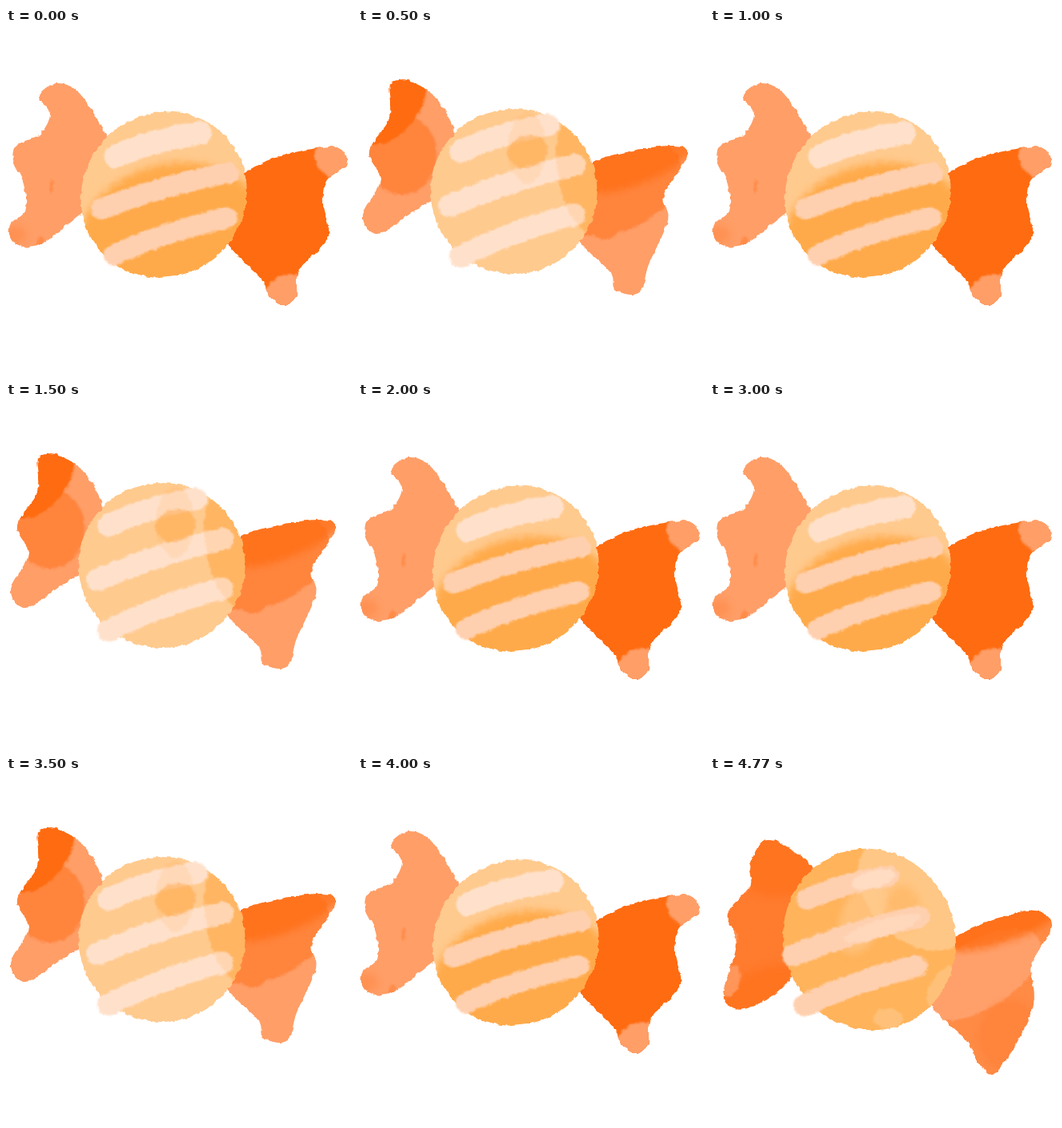
These frames come from a looping animation (432 by 432 pixels, 5.01 s). An HTML page:

```html
<!DOCTYPE html>
<html lang="en">
<head>
<meta charset="utf-8">
<title>Candy</title>
<style>
  html, body { margin: 0; width: 100%; height: 100%; overflow: hidden; background: #fff; }
  svg { display: block; width: 100vw; height: 100vh; }
  .pose { visibility: hidden; }
  .stripe { fill: none; stroke-linecap: round; }
</style>
</head>
<body>
<svg id="stage" viewBox="0 0 432 432" color-interpolation-filters="sRGB">
  <defs>
    <filter id="rough" filterUnits="userSpaceOnUse" x="0" y="0" width="432" height="432">
      <feTurbulence type="fractalNoise" baseFrequency=".13" numOctaves="2" seed="4"/>
      <feDisplacementMap in="SourceGraphic" scale="5" xChannelSelector="R" yChannelSelector="G"/>
    </filter>
    <filter id="soft" filterUnits="userSpaceOnUse" x="0" y="0" width="432" height="432">
      <feGaussianBlur stdDeviation="1.2"/>
    </filter>
    <filter id="wash" filterUnits="userSpaceOnUse" x="0" y="0" width="432" height="432">
      <feGaussianBlur stdDeviation="5"/>
    </filter>
  </defs>
</svg>
<script>
const DEEP = '#ff6b10', MID = '#ff7f34', PALE = '#ff9e67';
const AMBER = '#ffaa4a', HONEY = '#ffca8e', CREAM = '#ffe1cb', PEACH = '#ffd0af';

// Closed smooth curve through "x,y x,y ..." key points.
function curve(text) {
  const p = text.split(' ').map(s => s.split(',').map(Number));
  const at = i => p[(i + p.length) % p.length];
  const handle = (from, a, b, sign) => from.map((v, k) => v + sign * (b[k] - a[k]) / 6);
  return `M${p[0]}` + p.map((b, i) => {
    const a = at(i - 1), c = at(i + 1), d = at(i + 2);
    return `C${handle(b, a, c, 1)} ${handle(c, b, d, -1)} ${c}`;
  }).join('') + 'Z';
}

const oval = (cx, cy, rx, ry, turn = 0) =>
  `<ellipse cx="${cx}" cy="${cy}" rx="${rx}" ry="${ry}" transform="rotate(${turn} ${cx} ${cy})"/>`;

const tint = (color, opacity, shape, filter = 'soft') =>
  `<g filter="url(#${filter})"><g fill="${color}" opacity="${opacity}">${shape}</g></g>`;
const wash = (color, opacity, shape) => tint(color, opacity, shape, 'wash');

// A shape filled with one colour, with tints kept inside its outline.
let clips = 0;
function piece(shape, fill, ...tints) {
  const id = 'clip' + clips++;
  return `<clipPath id="${id}">${shape}</clipPath>
    <g fill="${fill}">${shape}</g><g clip-path="url(#${id})">${tints.join('')}</g>`;
}
const wing = (points, fill, ...tints) => piece(`<path d="${curve(points)}"/>`, fill, ...tints);

function stripe(color, width, x1, y1, x2, y2) {
  const bend = 8, mx = (x1 + x2) / 2, my = (y1 + y2) / 2 - bend;
  return `<path class="stripe" d="M${x1} ${y1}Q${mx} ${my} ${x2} ${y2}"
    stroke="${color}" stroke-width="${width}" filter="url(#soft)"/>`;
}

const curledLeft = '41,85 64,69 94,84 131,145 150,190 92,233 42,271 10,268 5,246 24,228 22,195 9,165 14,146 42,133 55,107';
const curledRight = '298,181 350,158 412,149 425,170 400,191 396,222 402,262 366,302 362,335 345,346 328,333 318,312 279,272 260,225';
const foldedLeft = '40,92 40,72 60,65 98,88 123,140 112,195 65,232 24,257 6,235 28,190 14,155 38,116';
const foldedRight = '290,171 335,155 395,147 411,160 382,208 387,240 362,298 355,326 340,333 320,325 315,305 277,267 250,220';
const openLeft = '50,112 68,80 100,91 130,122 130,200 92,262 42,291 17,275 33,210 22,172 50,138';
const openRight = '303,203 355,179 405,168 427,188 402,235 404,285 378,342 355,371 338,362 318,328 278,288 260,235';

const tiltedBall = oval(197, 208, 106, 101, -45);
const lowerGlow = oval(205, 255, 115, 85, -15);
const rightTips = tint(PALE, 1, oval(414, 164, 30, 24, 25) + oval(346, 331, 30, 20, -35));
const topFold = oval(38, 95, 58, 38, -50);
const sideShade = oval(282, 185, 32, 75, -12);

const curled =
  wing(curledLeft, PALE,
    wash('#ff8846', .6, oval(10, 258, 15, 12)),
    tint(MID, .6, oval(42, 267, 4, 7, 20) + oval(57, 198, 2, 8))) +
  wing(curledRight, DEEP, rightTips) +
  piece(tiltedBall, HONEY, wash(AMBER, 1, lowerGlow)) +
  stripe(CREAM, 29, 137, 160, 242, 131) +
  stripe(PEACH, 26, 119, 226, 278, 181) +
  stripe(PEACH, 26, 135, 283, 276, 237);

const turning =
  wing(foldedLeft, MID, wash(DEEP, .6, topFold)) +
  wing(curledRight, MID, wash(DEEP, .6, oval(350, 180, 90, 34, -18)), rightTips) +
  piece(tiltedBall, HONEY, wash(AMBER, .5, lowerGlow)) +
  stripe(CREAM, 28, 132, 158, 239, 126) +
  stripe(CREAM, 27, 116, 224, 275, 176) +
  stripe(CREAM, 27, 130, 284, 273, 235);

const folded =
  wing(foldedLeft, PALE, tint(MID, .8, oval(54, 158, 44, 50)), tint(DEEP, 1, topFold)) +
  wing(foldedRight, PALE,
    tint(MID, .8, oval(325, 200, 85, 52, -25) + oval(308, 248, 18, 16)),
    wash(DEEP, .7, oval(335, 165, 90, 34, -18))) +
  piece(oval(194.5, 204, 104, 103), HONEY, tint(AMBER, .55, sideShade)) +
  stripe(CREAM, 28, 128, 154, 237, 121) +
  stripe(CREAM, 28, 114, 222, 271, 171) +
  stripe(CREAM, 28, 128, 285, 270, 233) +
  tint(AMBER, .5, oval(212, 154, 25, 20, -15)) +
  tint(AMBER, .15, oval(211, 150, 24, 44)) +
  piece(oval(194.5, 204, 104, 103), 'none', tint(AMBER, .2, sideShade));

const open =
  wing(openLeft, '#ff7b2d',
    wash(DEEP, .45, oval(85, 110, 55, 40) + oval(70, 275, 60, 35, -20)),
    tint(PALE, .8, oval(26, 256, 11, 20, 15) + oval(28, 203, 6, 12))) +
  wing(openRight, '#ff8b45',
    tint('#ffa06b', 1, oval(338, 248, 85, 42, -32)),
    wash(DEEP, .8, oval(365, 188, 75, 20, -18)),
    wash(MID, .5, oval(375, 325, 40, 45))) +
  piece(oval(199, 204, 107, 114, -20), '#ffb35a',
    tint(HONEY, .85, oval(258, 145, 85, 60, 45)),
    wash(AMBER, .4, oval(240, 165, 22, 28)),
    wash(HONEY, .6, oval(190, 175, 26, 50, 20)),
    tint(HONEY, .6, oval(222, 303, 18, 13) + oval(288, 262, 12, 28, 30))) +
  stripe(PEACH, 26, 121, 154, 223, 125) +
  stripe(PEACH, 28, 104, 224, 260, 176) +
  stripe(PEACH, 28, 118, 286, 257, 238) +
  tint(CREAM, .7, oval(204, 129, 28, 11, -15)) +
  tint(CREAM, .45, oval(215, 190, 50, 11, -17));

const stage = document.getElementById('stage');
stage.insertAdjacentHTML('beforeend', [curled, turning, folded, open]
  .map(pose => `<g class="pose" filter="url(#rough)">${pose}</g>`).join(''));
const groups = [...stage.querySelectorAll('.pose')];

const LOOP = 5010, CYCLE = 1000, STARTS = [0, 270, 500, 770];
const origin = performance.now();

// Five equal cycles; the last pose holds until the loop ends.
function poseAt(time) {
  const t = Math.min(time % LOOP, 5 * CYCLE - 1);
  return STARTS.filter(start => start <= t % CYCLE).length - 1;
}

function draw() {
  const current = poseAt(performance.now() - origin);
  groups.forEach((g, i) => { g.style.visibility = i === current ? 'visible' : 'hidden'; });
  requestAnimationFrame(draw);
}
draw();
</script>
</body>
</html>
```
